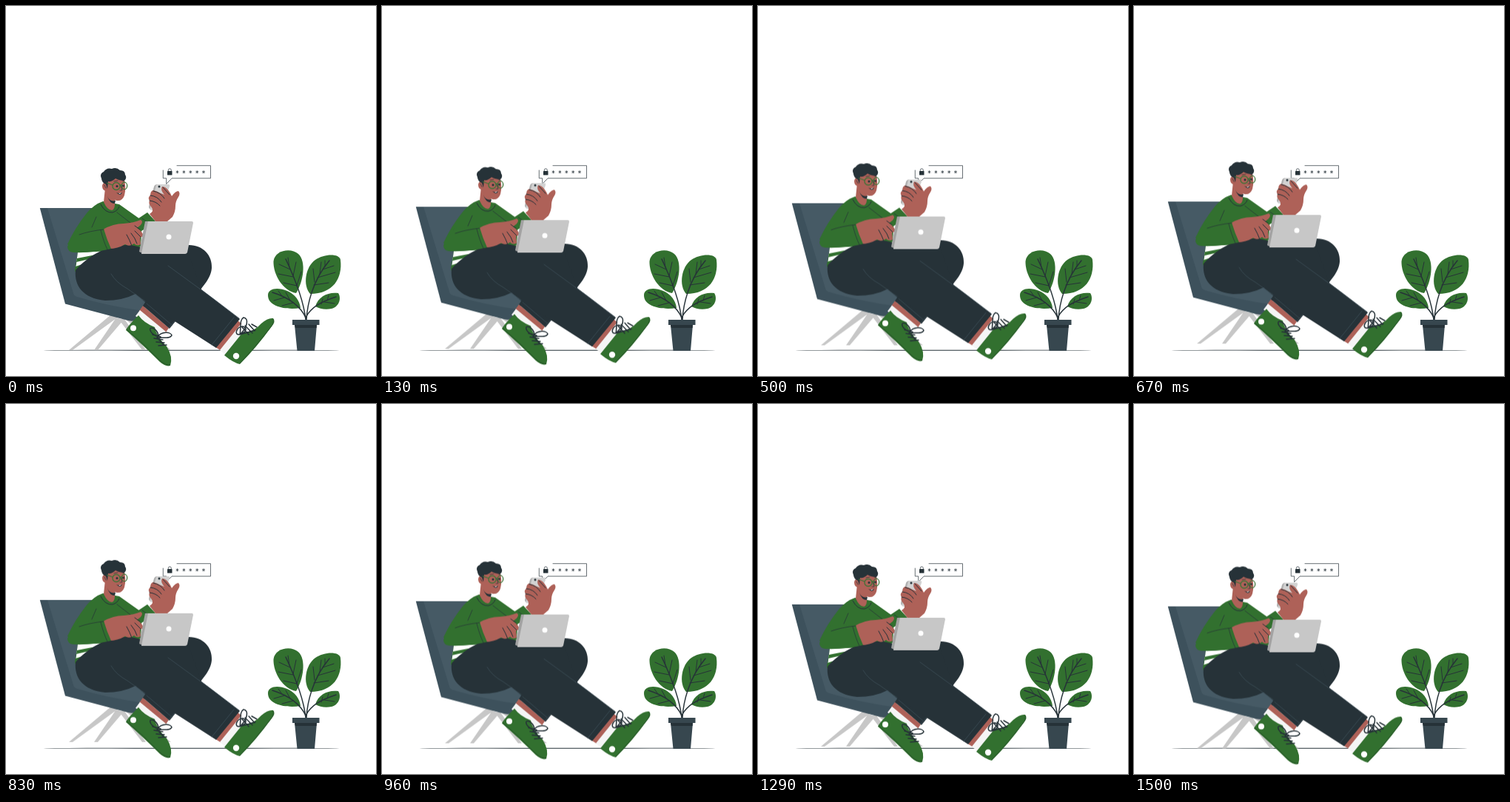
Recreate the animation shown at these times as an HTML page without scripts. Size 500 px wide and 500 px high, loop 1540 ms.

```html
<!DOCTYPE html>
<html lang="en">
<head>
<meta charset="utf-8">
<title>Password on the phone</title>
<style>
  html, body { margin: 0; width: 100%; height: 100%; overflow: hidden; background: #fff; }
  svg { display: block; width: 100vw; height: 100vh; }
  .green { fill: #32702f; }
  .dark { fill: #263238; }
  .slate { fill: #37474f; }
  .skin { fill: #ae6158; }
  .grey { fill: #c7c7c7; }
  .white { fill: #fff; }
  .sock { fill: #f5f5f5; }
  .line { fill: none; stroke: #263238; stroke-width: 1; stroke-linecap: round; stroke-linejoin: round; }
  .fine { stroke-width: .7; }
  .bold { stroke-width: 1.5; }
  .seam { fill: none; stroke: #3d4e57; stroke-width: .8; stroke-linecap: round; }
  .sole { fill: none; stroke: #27552a; }
  .float { animation: float 1540ms linear -40ms infinite; }
  @keyframes float {
    0%, 100% { transform: translateY(.5px); }
    50% { transform: translateY(-9.5px); }
  }
</style>
</head>
<body>
<svg viewBox="0 0 500 500">
  <defs>
    <path id="star" class="line fine" d="M0-1.7V1.7M-1.5-.85L1.5 .85M-1.5 .85L1.5-.85"/>
  </defs>

  <ellipse class="dark" cx="250.500" cy="465.200" rx="200" ry=".5"/>

  <g id="plant">
    <g class="green">
      <path d="M392 388C374 385 361 363 361.500 345C363 330 385 326 395 335C406 345 402 372 392 388Z"/>
      <path d="M411 389C401 378 404 353 418 343C430 335 450 334 452 343C455 368 442 389 411 389Z"/>
      <path d="M398 408C380 411 354 407 354 391C354 381 368 380 380 385C390 389 397 398 398 408Z"/>
      <path d="M418 406C422 392 436 386 449 388C454 396 449 407 440 409C431 411 424 409 418 406Z"/>
    </g>
    <g class="line">
      <path class="bold" d="M405 424C403 405 395 378 378 342M406 424C407 404 414 371 437 344"/>
      <path class="bold" d="M405 421C397 404 382 394 360 387M405 421C412 407 425 400 446 393"/>
      <path d="M383 353L381 340M388 365L392 346M393 378L399 359M384 356L369 349M388 366L368 362M393 378L375 374"/>
      <path d="M431 352L431 344M424 362L426 346M417 373L415 355M428 356L443 351M421 367L445 360M416 377L436 374"/>
      <path d="M373 392L368 385M384 398L378 387M376 394L362 398M388 401L373 405M434 398L436 391M426 403L428 396M430 400L444 402"/>
    </g>
    <path class="slate" d="M387 424H423.500V431H420L417 466H393.500L390 431H387Z"/>
    <path class="dark" d="M390 431H420L419.600 435H391Z"/>
  </g>

  <g id="bubble">
    <path class="line fine" stroke-linecap="butt" d="M231 215.700H276.500V232.800H224L216.700 240.500V232.800H212.300V222"/>
    <path class="line fine" d="M219.300 223V221.800a2 2 0 0 1 4 0V223"/>
    <rect class="dark" x="218" y="223" width="6.500" height="5.500" rx=".6"/>
    <use href="#star" x="231.500" y="224.300"/>
    <use href="#star" x="240.400" y="224.300"/>
    <use href="#star" x="249.300" y="224.300"/>
    <use href="#star" x="258.200" y="224.300"/>
    <use href="#star" x="267" y="224.300"/>
  </g>

  <g class="float">
    <g id="chair">
      <path class="grey" d="M142 417L152 420L90 465H85ZM149 421L159 424L124 465H119ZM152 423H160L189 465H184ZM159 422L167 420L223 465H217Z"/>
      <path fill="#3d515c" d="M45.800 273H125L190 400L180 423Q173 427 165 425L80 402.500Z"/>
      <path fill="#465a65" d="M56 273H125L190 398L186 412Q140 406 96 393Q92 392 91 388Z"/>
    </g>

    <g id="shirt">
      <path class="green" d="M131 264Q119 268 109 280Q93 300 83 322L97 333L93 357L140 352L182 325L184 290L153 268Z"/>
      <path class="white" d="M97 333L143 331L130 346L94 356Z"/>
      <path class="green" d="M96 341L142 332L130 338L95 346ZM94 352L112 346L101 356L93 359Z"/>
      <path class="green" d="M173 291L191 279L203 292L183 304Z"/>
      <path class="line fine" d="M150 279L172 296M184 287L192 293"/>
    </g>

    <g id="back-leg">
      <path class="skin" d="M185 405L220 435L216 441L180 412Z"/>
      <path class="sock" d="M181 411L216 440L212 446L175 419Z"/>
      <path class="green" d="M179 418Q186 428 201 434Q203 446 217 460Q226 474 222 486Q216 488 208 481Q184 457 162 438Q164 433 179 418Z"/>
      <path class="sole" d="M163 437Q185 455 208 479Q216 486 222 485"/>
      <circle class="white" cx="172" cy="435.300" r="4"/>
      <path class="line bold" d="M203 446C193 441 192 432 200 436C206 440 207 446 204 448C211 438 223 441 224 445C222 450 211 448 204 448L213 458M198 444L209 447M200 449L212 451M203 454L214 455M206 459L217 458"/>
      <path class="dark" d="M238 324C263 319 279 335 278 354C277 369 264 380 263 384L221 436L185 405L191 396Z"/>
      <path class="seam" d="M190 402L224 431M220 435L231 422"/>
    </g>

    <g id="front-leg">
      <path class="skin" d="M312 424L319 430L291 466L283 461Z"/>
      <path class="sock" d="M318 429L325 436L298 473L289 465Z"/>
      <path class="green" d="M295 472L320 441Q335 441 345 429Q354 421 361 422Q365 426 359 433Q339 461 316 484Q307 482 295 472Z"/>
      <path class="sole" d="M316 483Q337 461 357 435Q363 428 361 423"/>
      <circle class="white" cx="311" cy="473" r="4.200"/>
      <path class="line bold" d="M316 444C318 435 315 424 321 421C329 422 326 435 316 444C307 445 312 433 320 433C326 435 326 440 316 444L337 438M319 434L328 444M323 432L333 442M328 430L336 439M332 430L339 434"/>
      <path class="dark" d="M94 357C112 337 134 324 163 323C178 323 186 329 200 330H245L264 383L316 423L284 462L189 401L175 389Q158 398 134 398C104 395 92 378 94 357Z"/>
      <path class="seam" d="M142 362Q149 374 164 382L188 399M219 351L278 394L315 422M278 458L308 421"/>
    </g>

    <g id="typing-arm">
      <path class="skin" d="M131 302Q145 294 159 294Q173 293 182 289Q186 291 182 296L177 300Q184 304 186 311L181 313L182 322Q177 325 173 321Q167 326 161 322Q151 328 139 328Z"/>
      <path class="line" d="M163 309Q167 316 170 324M169 307Q175 314 177 321M174 297L181 302M174 304L182 312"/>
      <path class="green" d="M98 302L132 301Q136 315 142 328Q118 334 91 333Q83 332 83 325Z"/>
      <path class="line fine" d="M122 285L116 299M132 302Q113 304 99 309M128 303Q132 319 137 329"/>
    </g>

    <g id="laptop">
      <path fill="#a3a3a3" d="M188 291H195L186 335L180 332Z"/>
      <path class="grey" d="M192 291H251Q253 291 253 293L245 333Q244 335 242 335H183Z"/>
      <circle class="white" cx="220" cy="312" r="3.500"/>
    </g>

    <g id="phone-arm">
      <path fill="#d2d2d2" d="M205 241H219Q222 241 221 244L211 270L198 276Q193 276 194 272L201 244Q202 241 205 241Z"/>
      <path fill="#b0b0b0" d="M203 242L195 273Q193 275 193 271L200 244Q201 241 205 241Z"/>
      <circle class="dark" cx="207" cy="244" r="1.500"/>
      <path class="skin" d="M194 281Q201 277 196 271Q192 267 194 263Q191 259 195 256Q195 250 199 249Q204 250 209 253L214 255Q208 248 211 244Q217 244 222 253L224 257Q229 250 233 250Q236 253 233 258Q229 264 229 270Q229 278 225 285L218 291H202Z"/>
      <path class="line" d="M199 250Q209 252 214 260M195 256Q205 257 210 265M194 263Q203 264 208 270M212 245L221 255"/>
    </g>

    <g id="head">
      <path class="skin" d="M134 246L132 265Q137 276 143 276Q148 275 147 263L151 254Z"/>
      <path class="dark" d="M137 257Q140 265 148 263L147 267Q140 267 137 257Z"/>
      <path class="line" d="M128 268Q134 280 144 279Q151 277 153 271"/>
      <path class="skin" d="M135 234L159 232Q163 244 160 256Q157 264 150 263Q141 262 136 250Q130 250 130 243Q131 238 135 239Z"/>
      <path class="dark" d="M135 241Q129 238 129 233Q126 227 132 224Q136 218 143 220Q149 217 154 222Q161 222 161 228Q164 232 160 236Q153 236 148 233Q143 238 138 237L137 247Z"/>
      <g fill="none" stroke="#3f7438" stroke-width="1.300">
        <circle cx="149" cy="243.500" r="5"/>
        <ellipse cx="160" cy="243" rx="3.700" ry="4.800"/>
        <path d="M136 239L144 242M154 242H156"/>
      </g>
      <circle class="dark" cx="150" cy="243.500" r="1.500"/>
      <circle class="dark" cx="158.500" cy="243" r="1.400"/>
      <path class="line fine" d="M146 237L151 236M157 236L160 237M155 243L157 249L154 249M133 242L135 246"/>
      <path class="dark" d="M149 252Q153 254 157 252Q155 258 149 252Z"/>
      <path class="white" d="M150 252Q153 254 156 252L154 254Z"/>
    </g>
  </g>
</svg>
</body>
</html>
```
